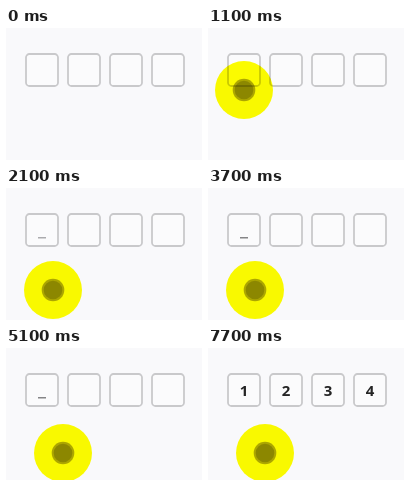
Animation, 196 px wide and 132 px high, one loop 8000 ms. Source, as an HTML page with a canvas:

```html
<!DOCTYPE html>
<html lang="en">
<head>
<meta charset="utf-8">
<title>PIN input</title>
<style>
  html, body { margin: 0; width: 100%; height: 100%; overflow: hidden; background: #f9f9fb; }
  canvas { display: block; width: 196px; height: 132px; }
</style>
</head>
<body>
<canvas id="stage" width="196" height="132"></canvas>
<script>
const ctx = document.getElementById('stage').getContext('2d');
const LOOP = 8000;
const STEP = 100;
const DIGIT_TIMES = [6200, 6500, 6800, 7100];

// Pointer stops: time, x, y
const POINTER = [
  [600, 22, 140], [1100, 36, 62], [1300, 37, 46], [1700, 37, 46], [2100, 47, 102],
  [4400, 47, 102], [4500, 43, 65], [4600, 39, 44], [4800, 39, 44], [5100, 57, 105],
  [LOOP, 57, 105]
];

const clamp = v => Math.max(0, Math.min(1, v));
const ease = v => v * v * (3 - 2 * v);

function pointerAt(t) {
  if (t < POINTER[0][0]) return null;
  const i = POINTER.findIndex(p => p[0] > t);
  const [t0, x0, y0] = POINTER[i - 1];
  const [t1, x1, y1] = POINTER[i];
  const k = ease((t - t0) / (t1 - t0));
  return [x0 + (x1 - x0) * k, y0 + (y1 - y0) * k];
}

// The caret is lit for the first half of each second, then fades out.
function caretOpacity(t) {
  const focus = t >= 4800 ? 4900 : 1700;
  if (t < focus || (t >= 4400 && t < 4900)) return 0;
  if (t >= DIGIT_TIMES[0]) return 1;
  const phase = (t - focus) % 1000;
  return clamp((560 - phase) / 240);
}

function disc(x, y, radius, color) {
  ctx.fillStyle = color;
  ctx.beginPath();
  ctx.arc(x, y, radius, 0, Math.PI * 2);
  ctx.fill();
}

function drawBox(index) {
  ctx.beginPath();
  ctx.roundRect(20 + index * 42, 26, 32, 32, 3.5);
  ctx.fillStyle = '#fbfbfc';
  ctx.fill();
  ctx.strokeStyle = '#c9c9cb';
  ctx.lineWidth = 1.8;
  ctx.stroke();
}

function draw(t) {
  ctx.fillStyle = '#f9f9fb';
  ctx.fillRect(0, 0, 196, 132);
  for (let i = 0; i < 4; i++) drawBox(i);

  const typed = DIGIT_TIMES.filter(time => t >= time).length;
  ctx.font = 'bold 15px "Open Sans", "Noto Sans", sans-serif';
  ctx.textAlign = 'center';
  ctx.fillStyle = '#252525';
  for (let i = 0; i < typed; i++) ctx.fillText(i + 1, 36 + i * 42, 48);

  if (typed < 4) {
    ctx.globalAlpha = caretOpacity(t);
    ctx.fillStyle = '#858587';
    ctx.fillRect(32 + typed * 42, 49, 8, 1.5);
    ctx.globalAlpha = 1;
  }

  const pointer = pointerAt(t);
  if (pointer) {
    ctx.globalCompositeOperation = 'multiply';
    disc(...pointer, 29, '#ffff00');
    disc(...pointer, 11.3, '#b0aa20');
    disc(...pointer, 9.3, '#cfcf80');
    ctx.globalCompositeOperation = 'source-over';
  }
}

const start = performance.now();
function tick() {
  const t = (performance.now() - start) % LOOP;
  draw(Math.floor(t / STEP) * STEP);
  requestAnimationFrame(tick);
}
tick();
</script>
</body>
</html>
```
